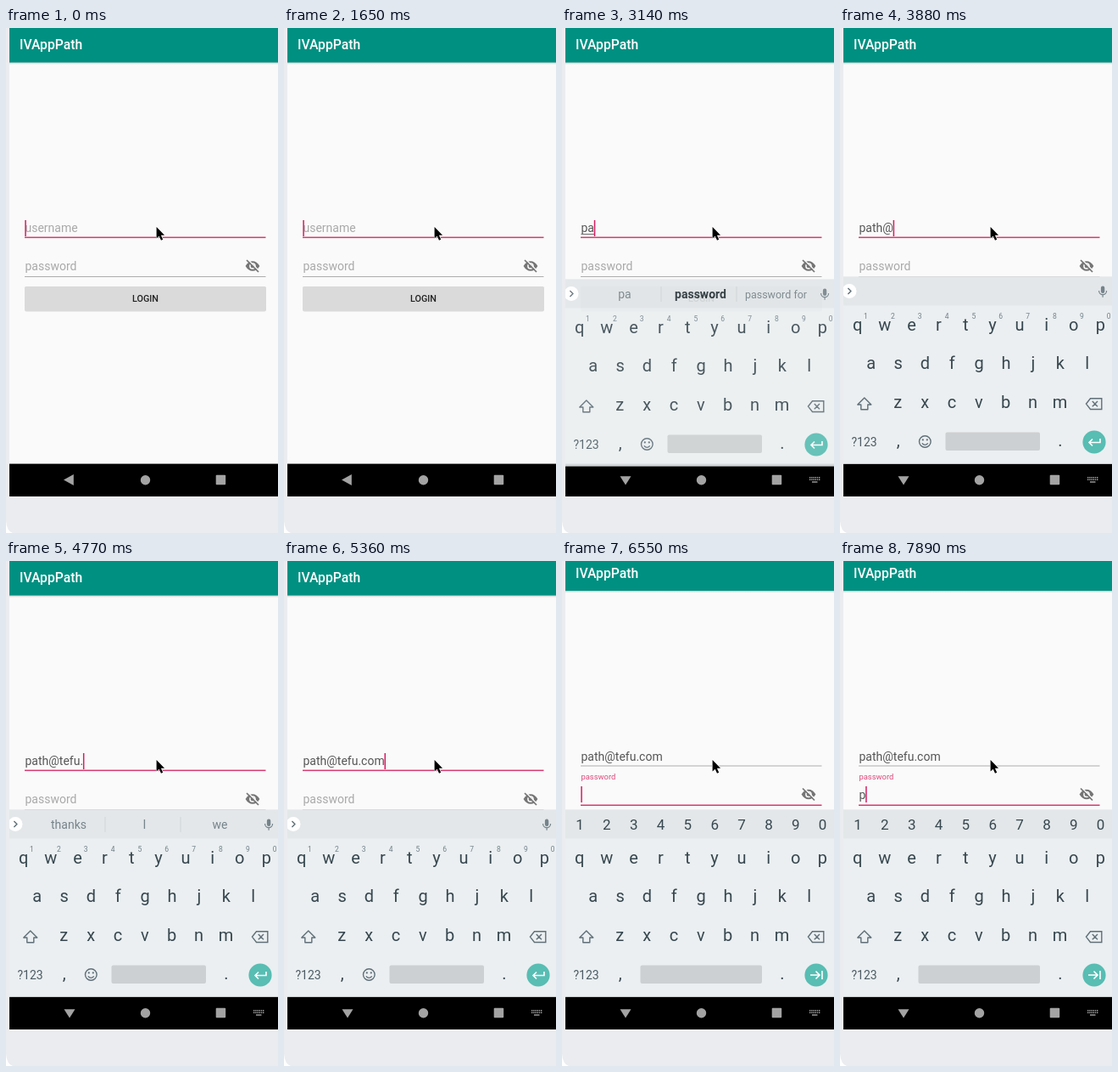
Animation, 321 px wide and 594 px high, one loop 8000 ms. Source, as an HTML page:

```html
<!DOCTYPE html>
<html lang="en">
<head>
<meta charset="utf-8">
<title>Login form</title>
<style>
  html, body { margin: 0; width: 100%; height: 100%; overflow: hidden; background: #fff; }
  svg { display: block; width: 321px; height: 594px; font-family: Roboto, sans-serif; }
  .mid { text-anchor: middle; }
  .hint { fill: #a9a9a9; font-size: 14px; }
  .entry { fill: #565656; font-size: 14px; }
  .key { fill: #37474f; font-size: 20px; }
  .alt { fill: #71818a; font-size: 8.5px; }
  .num { fill: #37474f; font-size: 17px; }
  .sug { fill: #76848b; font-size: 14px; }
  .line { fill: none; stroke: #5f6f78; stroke-width: 1.4; }
</style>
</head>
<body>
<svg viewBox="0 0 321 594">
  <defs>
    <linearGradient id="shade" x1="0" y1="0" x2="0" y2="1">
      <stop offset="0" stop-opacity=".16"/>
      <stop offset="1" stop-opacity="0"/>
    </linearGradient>
    <clipPath id="screen"><rect x="4" width="317" height="551"/></clipPath>
  </defs>
  <path d="M0 0H321V594H8Q1 592 0 580Z" fill="#ebecef"/>
  <g clip-path="url(#screen)">
    <rect x="4" width="317" height="513" fill="#fafafa"/>
    <g id="page">
      <rect x="4" width="317" height="40.6" fill="#009081"/>
      <rect x="4" y="40.6" width="317" height="2.5" fill="url(#shade)"/>
      <text x="16" y="25.2" fill="#fff" font-size="15.7" font-weight="500">IVAppPath</text>

      <text id="userHint" class="hint" x="22.5" y="240">username</text>
      <text id="user" class="entry" x="22.5" y="240" xml:space="preserve"></text>
      <rect id="compose" x="22.5" y="242" height="1" fill="#6a6a6a"/>
      <rect id="userLine" x="22" width="284.5"/>

      <text id="passHint" class="hint" x="22.5" y="284.5">password</text>
      <text id="passLabel" x="22.5" fill="#dd4a7c" font-size="9.4">password</text>
      <text id="pass" class="entry" x="22.5" y="285"></text>
      <rect id="passLine" x="22" width="284.5"/>
      <rect id="caret" width="1.5" height="19" fill="#d81b60"/>

      <g transform="translate(291 280)">
        <path d="M-8.4 0Q-5-5.8 0-5.8T8.4 0Q5 5.8 0 5.8T-8.4 0Z" fill="#757575"/>
        <circle r="3.1" fill="#757575" stroke="#fafafa" stroke-width="1.5"/>
        <path d="M-6-8L8 6" stroke="#fafafa" stroke-width="1.6"/>
        <path d="M-7-7L7 7" stroke="#757575" stroke-width="1.7"/>
      </g>

      <rect x="22" y="305" width="285" height="28.5" rx="2" opacity=".13"/>
      <rect x="22" y="304" width="285" height="28" rx="1.5" fill="#dadada"/>
      <text class="mid" x="164.5" y="322" fill="#222" font-size="10.8" font-weight="500">LOGIN</text>
    </g>

    <rect x="4" y="512.6" width="317" height="38.4"/>

    <g id="board">
      <rect x="4" y="292.5" width="317" height="220.1" fill="#ebeff1"/>
      <rect x="4" y="292.5" width="317" height="34" fill="#e3e7e9"/>
      <g id="strip">
        <circle cx="11" cy="309.5" r="8.5" fill="#fff"/>
        <path class="line" d="M9.4 306l3.5 3.5-3.5 3.5"/>
        <rect x="307.9" y="303.5" width="4.4" height="8.5" rx="2.2" fill="#75838a"/>
        <path d="M305.6 309a4.5 4.7 0 0 0 9 0M310.1 313.5v3.2" fill="none" stroke="#75838a" stroke-width="1.2"/>
        <g id="sugs">
          <path d="M117 301v18M206 301v18" stroke="#cfd5d8"/>
        </g>
      </g>
      <g id="digits"></g>
      <g id="keys"></g>
      <g id="alts"></g>

      <path class="line" d="M28.8 435l-8 8h4v5.7h8v-5.7h4z" stroke-linejoin="round"/>
      <path class="line" d="M295.5 435.7h13.3v12.8h-13.3l-5-6.4zM297.8 439l6.2 6.2m0-6.2l-6.2 6.2"/>
      <text class="mid" x="28.6" y="491.7" fill="#4b5b64" font-size="14">?123</text>
      <text class="mid key" x="68.6" y="492" font-size="18">,</text>
      <text class="mid key" x="260" y="492" font-size="18">.</text>
      <rect id="space" y="475.5" height="21.5" rx="2" fill="#cdd0d2"/>
      <g id="smile">
        <circle class="line" cx="100.3" cy="486.5" r="6.8"/>
        <path class="line" d="M96.8 488.4q3.5 4 7 0"/>
        <circle cx="97.8" cy="484.4" r="1.1" fill="#5f6f78"/>
        <circle cx="102.8" cy="484.4" r="1.1" fill="#5f6f78"/>
      </g>
      <circle cx="300" cy="487" r="13.6" fill="#58bdb3"/>
      <path id="action" fill="none" stroke="#fff" stroke-width="1.6"/>
    </g>

    <g fill="#a3a3a3">
      <path id="back"/>
      <circle cx="164.5" cy="531.7" r="5.7"/>
      <rect x="247.7" y="525.7" width="11.5" height="11.5" rx="1"/>
      <g id="imeIcon" stroke="#a3a3a3" stroke-width="1.4">
        <path d="M292 528.8h12.5M292 531.3h12.5" stroke-dasharray="1.4 .8"/>
        <path d="M295 534h6.5"/>
      </g>
    </g>
  </g>
  <path d="M177.6 234v13.6l3.1-2.9 2.3 5 2.2-1-2.3-4.9h4.2z" stroke="#fff" stroke-width="1.2" paint-order="stroke"/>
</svg>
<script>
const LOOP = 8000;
const MAIL = "path@tefu.com";
const $ = id => document.getElementById(id);
const show = (id, on) => $(id).setAttribute("display", on ? "inline" : "none");

function set(id, attrs) {
  for (const k in attrs) $(id).setAttribute(k, attrs[k]);
}

function label(parent, text, x, y, cls) {
  const t = document.createElementNS("http://www.w3.org/2000/svg", "text");
  t.setAttribute("class", "mid " + cls);
  t.setAttribute("x", x);
  t.setAttribute("y", y);
  t.textContent = text;
  $(parent).append(t);
  return t;
}

const STEP = 31.85;
[["qwertyuiop", 20.8, 355.6], ["asdfghjkl", 36.8, 401.4], ["zxcvbnm", 68.3, 447.4]].forEach(([row, x, y]) =>
  [...row].forEach((c, i) => label("keys", c, x + i * STEP, y, "key")));
[..."1234567890"].forEach((d, i) => {
  label("alts", d, 30.5 + i * STEP, 342, "alt");
  label("digits", d, 21 + i * STEP, 316.2, "num");
});
const words = [74, 163.5, 252.5].map(x => label("sugs", "", x, 314.7, "sug"));

// Start time of each typed length of the address
const typed = [2990, 3140, 3280, 3580, 3880, 4180, 4330, 4480, 4630, 4770, 4910, 5060, 5360];
// Times at which the caret flips, beginning visible
const flips = [150, 600, 1050, 1650, 2100, 2550, 6100, 6550, 7290, 7890];
// Suggestions by typed length; composing words mark the middle one bold
const hints = {
  2: ["pa", "password", "password for"],
  3: ["pat", "path", "patch"],
  4: ["paths", "path", "pathos"],
  10: ["thanks", "I", "we"]
};
const passed = (list, t) => list.filter(s => t >= s).length;

function draw(t) {
  const n = passed(typed, t);
  const open = n > 0;
  const inPass = t >= 5660;
  const pass = t >= 6840 ? "p" : "";

  set("page", { transform: `translate(0 ${inPass ? -5.5 : 0})` });
  $("user").textContent = MAIL.slice(0, n);
  $("pass").textContent = pass;
  show("userHint", !open);
  show("passHint", !inPass);
  show("passLabel", inPass);
  set("passLabel", { y: t < 5810 ? 263 : 262 });

  const on = { fill: "#d7386f", height: 1.5 }, off = { fill: "#adadad", height: 1 };
  set("userLine", { y: inPass ? 246 : 245.6, ...(inPass ? off : on) });
  set("passLine", { y: 292, ...(inPass ? on : off) });

  const width = $(inPass ? "pass" : "user").getComputedTextLength();
  set("caret", { x: 22.3 + width, y: inPass ? 270.5 : 226 });
  show("caret", passed(flips, t) % 2 === 0);
  show("compose", n > 0 && n < 5);
  set("compose", { width });

  show("board", open);
  const [drop, alpha] = t < 3140 ? [20, .5] : t < 3280 ? [3, .9] : [0, 1];
  set("board", { transform: `translate(0 ${drop})`, opacity: alpha });
  for (const id of ["strip", "smile", "alts"]) show(id, !inPass);
  show("digits", inPass);
  const left = inPass ? 92.5 : 124.5;
  set("space", { x: left, width: 236 - left });
  set("action", { d: inPass
    ? "M293 487h10.5M299.5 482.5l4.5 4.5-4.5 4.5M307 482v10"
    : "M307 483v4.5h-13M298 483.5l-4 4 4 4" });

  const list = hints[n];
  show("sugs", !!list);
  if (list) words.forEach((w, i) => {
    w.textContent = list[i];
    const bold = i === 1 && n < 5;
    w.style.fontWeight = bold ? 700 : 400;
    w.style.fill = bold ? "#263238" : "";
    w.style.fontSize = list[i].length > 9 ? "12.5px" : "";
  });

  set("back", { d: open ? "M68.5 527.3h13l-6.5 10.2z" : "M79.8 525v13l-11.8-6.5z" });
  show("imeIcon", open);
}

function tick() {
  draw(performance.now() % LOOP);
  requestAnimationFrame(tick);
}
tick();
</script>
</body>
</html>
```
